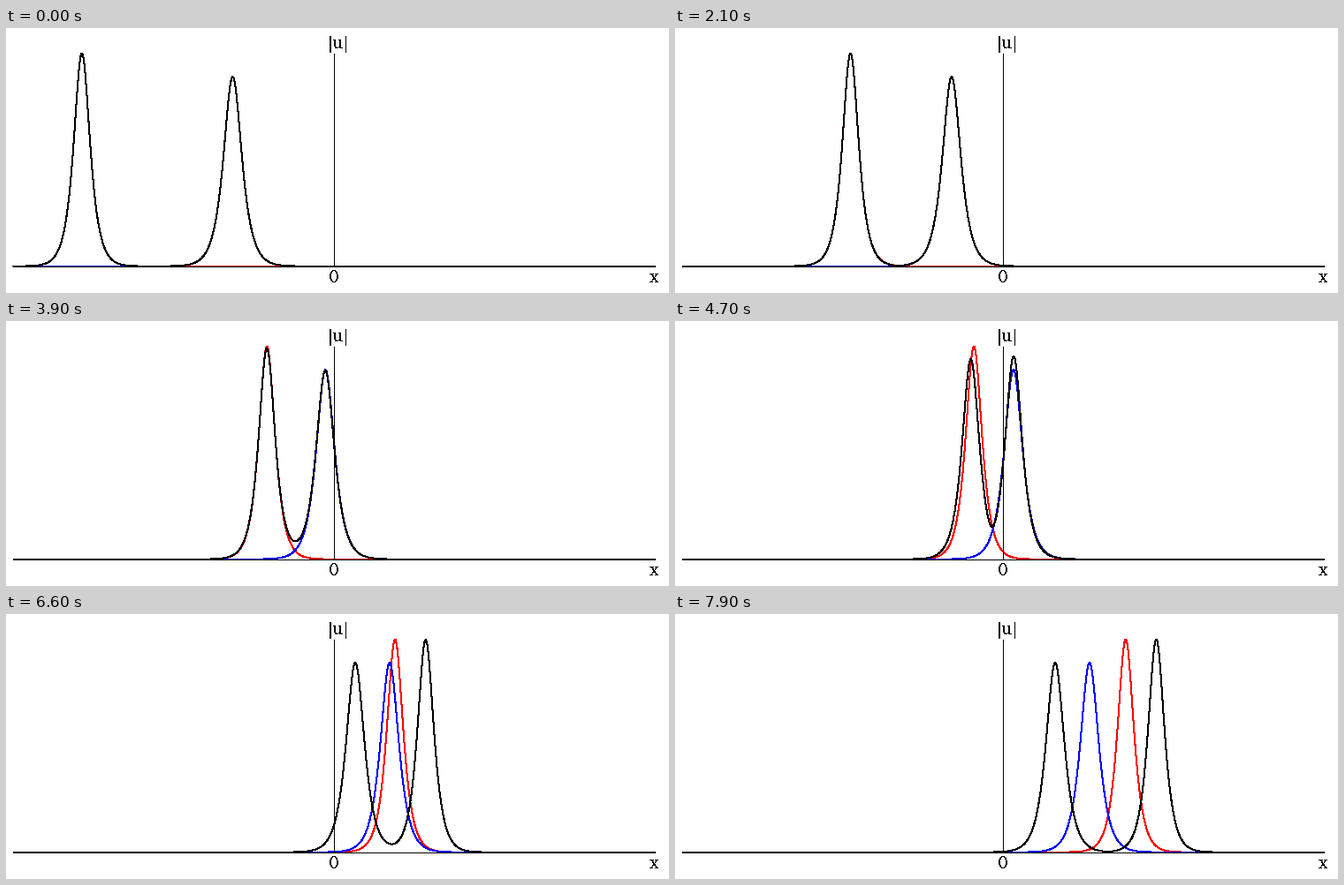
A matplotlib script that plays this animation: 750x300 px, repeating every 8 s.

```python
import numpy as np
import matplotlib.pyplot as plt
from matplotlib.animation import FuncAnimation

# Two-soliton collision of a complex wave u(x, t); lengths in pixels, time in frames.
W, H, DPI = 750, 300, 100
FRAMES, STEP = 80, 100
X0, BASE, HEIGHT = 371.5, 269.72, 241
T0 = 50                      # frame at which the pulses meet
K1, K2 = 0.1225, 0.109       # inverse widths, proportional to amplitude
V1, V2 = 5.367, 2.69         # speeds
DK = 0.0245                  # wavenumber difference
PHASE, SPIN = 2.59, 0.253    # relative phase at the meeting and its rate

L1, L2 = K1 + 1j * DK, K2 + 0j
SHIFT = np.log(abs(L1 + L2) ** 2 / abs(L1 - L2) ** 2)

# Without antialiasing every touched pixel is filled, so pens are thinner than they look.
THIN, THICK = 0.4, 1

plt.rcParams["text.antialiased"] = False
plt.rcParams["path.simplify"] = False
plt.rcParams["font.family"] = "DejaVu Serif"


def px(n):
    return n * 72 / DPI


def single(x, t, k, v, side):
    """Undisturbed pulse as it would travel without a collision."""
    centre = v * t + side * SHIFT / (2 * k)
    return k / K1 / np.cosh(k * (x - centre))


def pair(x, t):
    """Modulus of the two-soliton solution."""
    g1 = np.exp(K1 * (x - V1 * t)) + 0j
    g2 = np.exp(K2 * (x - V2 * t) + 1j * (PHASE - DK * x + SPIN * t))

    def m(ga, gb, la, lb):
        return (1 / ga + np.conj(gb)) / (la + np.conj(lb))

    a, b = m(g1, g1, L1, L1), m(g1, g2, L1, L2)
    c, d = m(g2, g1, L2, L1), m(g2, g2, L2, L2)
    return np.abs((a + d - b - c) / (a * d - b * c)) / K1


fig = plt.figure(figsize=(W / DPI, H / DPI), dpi=DPI, facecolor="white")
ax = fig.add_axes([0, 0, 1, 1])
ax.set_xlim(0, W)
ax.set_ylim(H, 0)
ax.axis("off")


def line(xs, ys, color, width):
    return ax.plot(xs, ys, color=color, lw=px(width), antialiased=False, snap=False,
                   solid_capstyle="butt", solid_joinstyle="round")[0]


cols = np.arange(8, 735.5, 0.5)
xs = cols - X0
curves = [line(cols, np.full_like(cols, BASE), c, THICK) for c in ("red", "blue", "black")]

# The axes lie over the curves.
line([8, 735], [270.5, 270.5], "black", THIN)
line([371.5, 371.5], [29, 270], "black", THIN)
for label, lx, ly in (("|u|", 375.5, 22.5), ("0", 370.5, 288), ("x", 733.5, 288)):
    ax.text(lx, ly, label, size=px(18.8), ha="center", va="baseline")


def draw(i):
    t = i - T0
    waves = (single(xs, t, K1, V1, -1), single(xs, t, K2, V2, 1), pair(xs, t))
    for curve, u in zip(curves, waves):
        curve.set_ydata(BASE - HEIGHT * u)
    return curves


anim = FuncAnimation(fig, draw, frames=FRAMES, interval=STEP, repeat=True, repeat_delay=0)
plt.show()
```
